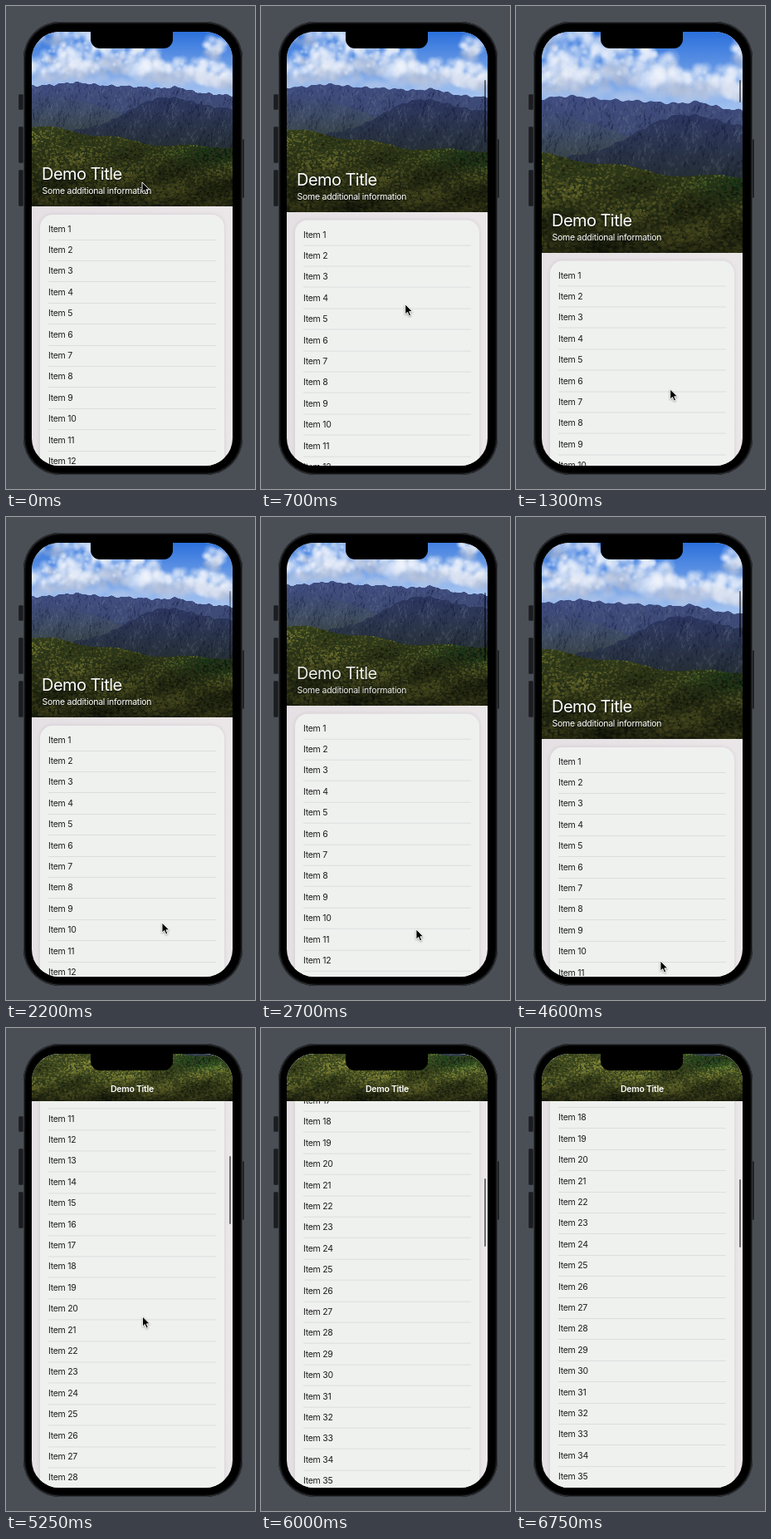
Animation, 300 px wide and 581 px high, one loop 6.8 s. Source, as an HTML page with a canvas:

```html
<!DOCTYPE html>
<html lang="en">
<head>
<meta charset="utf-8">
<title>Sticky header demo</title>
<style>
  html, body { margin: 0; width: 100%; height: 100%; overflow: hidden; background: #4a4f56; }
  #stage { position: relative; width: 300px; height: 581px; overflow: hidden; font-family: Inter, Roboto, sans-serif; }
  #stage div, canvas, svg { position: absolute; }
  .button { background: #1b1d20; border-radius: 2px; box-shadow: inset 0 0 0 .5px #303338; }
  #body { left: 20.5px; top: 19px; width: 264px; height: 545px; border-radius: 44px; background: #000; box-shadow: inset 0 0 0 1px #35373a, inset 0 0 0 2.5px #121315; }
  #screen { left: 31px; top: 31px; width: 241.5px; height: 522px; border-radius: 33px; overflow: hidden; background: linear-gradient(90deg, #e5e0e3, #ebe7e9); }
  #list { left: 0; top: .4px; width: 242px; }
  #card { left: 10px; top: 220px; width: 222px; height: 1060px; border-radius: 15px; background: #eff1ef; box-shadow: 0 0 5px rgba(60, 40, 60, .13); }
  .row { left: 10px; width: 202px; height: 25.4px; line-height: 25.4px; font-size: 10.5px; letter-spacing: -.28px; color: #1d1d1d; white-space: nowrap; }
  .row::after { content: ""; position: absolute; left: 0; right: 0; bottom: -.5px; height: 1px; background: #dcdedd; }
  #header { left: 0; top: 0; width: 242px; overflow: hidden; color: #fff; white-space: nowrap; }
  #photo { bottom: 0; }
  #shade { inset: 0; background: linear-gradient(transparent 45%, rgba(0, 0, 0, .6)); }
  #big { inset: 0; text-shadow: .5px .5px 1px rgba(0, 0, 0, .6); }
  #title { left: 12px; bottom: 27px; font-size: 20px; line-height: 24px; letter-spacing: -.55px; }
  #sub { left: 12.5px; bottom: 10.6px; font-size: 10.5px; line-height: 14px; letter-spacing: -.26px; }
  #small { left: 0; width: 242px; top: 35px; text-align: center; font-weight: 600; font-size: 10.5px; line-height: 16px; letter-spacing: -.28px; }
  #bar { left: 237.5px; width: 2.4px; border-radius: 2px; background: rgba(0, 0, 0, .52); }
  #notch { left: 102px; top: 29px; width: 99px; height: 22px; border-radius: 0 0 11px 11px; background: #000; }
  #cursor { left: 0; top: 0; filter: drop-shadow(0 1px 1px rgba(0, 0, 0, .35)); }
</style>
</head>
<body>
<div id="stage">
  <div class="button" style="left:15px;top:106px;width:6px;height:19px"></div>
  <div class="button" style="left:15px;top:145px;width:6px;height:44px"></div>
  <div class="button" style="left:15px;top:197px;width:6px;height:44px"></div>
  <div class="button" style="left:283px;top:160px;width:4px;height:71px"></div>
  <div id="body"></div>
  <div id="screen">
    <div id="list"><div id="card"></div></div>
    <div id="header">
      <canvas id="photo" width="945" height="630"></canvas>
      <div id="shade"></div>
      <div id="big">
        <div id="title">Demo Title</div>
        <div id="sub">Some additional information</div>
      </div>
      <div id="small">Demo Title</div>
    </div>
    <div id="bar"></div>
  </div>
  <div id="notch"></div>
  <svg id="cursor" width="12" height="18" viewBox="-1 -1 12 18">
    <path d="M0 0V12L2.8 9.5L4.7 14L6.8 13.1L4.9 8.8H8.7Z" fill="#000" stroke="#fff" stroke-width=".9" stroke-linejoin="round"/>
  </svg>
</div>
<script>
const LOOP = 6800, STEP = 50, OPEN = 210, CLOSED = 57, ROW = 25.4, WIDE = 315;
const $ = id => document.getElementById(id);
const clamp = v => Math.min(1, Math.max(0, v));
const part = (t, a, b) => clamp((t - a) / (b - a));
const ease = (t, a, b) => {
  const u = part(t, a, b);
  return u * u * (3 - 2 * u);
};

// Landscape, in units of the open header
let seed = 11;
const rnd = () => (seed = seed * 16807 % 2147483647) / 2147483647;
const range = (a, b) => a + rnd() * (b - a);
const hill = (x, mid, w) => Math.exp(-(((x - mid) / w) ** 2));
const rough = x => .8 * Math.sin(x / 3.1) + .6 * Math.sin(x / 1.7 + 2);

const farRidge = x => 65 + 12 * ease(x, 130, 300) - 4 * hill(x, 88, 26) - 4 * hill(x, 212, 16) + rough(x);
const leftRidge = x => 78 + 42 * ease(x, 60, 230) - 3 * hill(x, 60, 20) + rough(x);
const nearRidge = x => 120 - 40 * hill(x, 196, 62) - 24 * hill(x, 300, 60) + rough(x);
const forestEdge = x => 114 + 24 * ease(x, 20, 230) + 2 * Math.sin(x / 13);

function paintPhoto() {
  const c = $('photo').getContext('2d');
  c.scale(3, 3);

  const fade = (y0, y1, from, to) => {
    const g = c.createLinearGradient(0, y0, 0, y1);
    g.addColorStop(0, from);
    g.addColorStop(1, to);
    return g;
  };
  const puff = (x, y, r, rgb, a) => {
    const g = c.createRadialGradient(x, y, 0, x, y, r);
    g.addColorStop(0, `rgba(${rgb},${a})`);
    g.addColorStop(1, `rgba(${rgb},0)`);
    c.fillStyle = g;
    c.fillRect(x - r, y - r, 2 * r, 2 * r);
  };
  // Puffs scattered in an ellipse, greyer towards its foot
  const cloud = (cx, cy, w, h, n) => {
    for (let i = 0; i < n; i++) {
      const a = range(0, 2 * Math.PI), d = Math.sqrt(rnd()), k = d * Math.sin(a);
      const rgb = k + range(-.4, .4) > .3 ? '170,184,212' : '240,244,252';
      puff(cx + w * d * Math.cos(a), cy + h * k, range(3, 10), rgb, .5);
    }
  };
  const fillBelow = (top, style) => {
    c.beginPath();
    c.moveTo(0, OPEN);
    for (let x = 0; x <= WIDE; x++) c.lineTo(x, top(x));
    c.lineTo(WIDE, OPEN);
    c.fillStyle = style;
    c.fill();
  };
  const mountain = (top, peak, from, to) => {
    c.save();
    fillBelow(top, fade(peak, peak + 62, from, to));
    c.clip();
    for (let i = 0; i < 1500; i++) {
      const x = range(0, WIDE), y = top(x) + range(0, 55);
      const lit = Math.sin(x / 6 + y / 9) + range(-1, 1) > 0;
      c.strokeStyle = lit ? 'rgba(122,138,155,.16)' : 'rgba(10,16,42,.22)';
      c.lineWidth = range(.5, 1.6);
      c.beginPath();
      c.moveTo(x, y);
      c.lineTo(x + range(-3, 2), y + range(2, 6));
      c.stroke();
    }
    c.restore();
  };

  c.fillStyle = fade(0, 75, '#2b70dc', '#a4c3f0');
  c.fillRect(0, 0, WIDE, OPEN);
  cloud(95, 6, 95, 9, 80);
  cloud(120, 30, 72, 20, 190);
  cloud(50, 45, 70, 13, 130);
  cloud(215, 47, 65, 13, 140);
  cloud(285, 58, 50, 9, 80);
  cloud(258, 20, 14, 12, 30);
  for (let x = 0; x < WIDE; x += 7) puff(x, range(54, 66), range(6, 12), '196,207,230', .4);

  mountain(farRidge, 62, '#3f4c80', '#3b4868');
  mountain(leftRidge, 75, '#3d4a78', '#414f46');
  mountain(nearRidge, 78, '#2b3560', '#303c46');

  // Trees, painted from the far edge to the near one
  fillBelow(forestEdge, '#35431f');
  const trees = 5200;
  for (let i = 0; i < trees; i++) {
    const d = i / trees, x = range(0, WIDE), edge = forestEdge(x);
    const y = edge + d * (214 - edge), r = .6 + d * 1.3 + rnd() * .7;
    const clump = Math.sin(x / 17 + y / 7) + Math.sin(x / 29 - y / 11);
    const dell = hill(x, 262, 45) * hill(y, 146, 12);
    const light = clamp(.5 + .17 * clump + range(-.3, .3) - .5 * dell);
    c.fillStyle = `hsl(${74 - 12 * light + 60 * dell}, 42%, ${11 + 27 * light}%)`;
    c.beginPath();
    c.ellipse(x, y, r, r * .85, 0, 0, 7);
    c.fill();
  }
}

function buildList() {
  for (let i = 0; i < 40; i++) {
    const row = document.createElement('div');
    row.className = 'row';
    row.textContent = 'Item ' + (i + 1);
    row.style.top = 4.3 + i * ROW + 'px';
    $('card').append(row);
  }
}

// Pull down and release, drag up, drag back, then flick and glide to rest
const pull = t => ease(t, 550, 1250) - ease(t, 1500, 2050);
const drag = t => ease(t, 2500, 3650);
const back = t => ease(t, 3850, 4600);
const glide = t => 1 - Math.exp(-((Math.max(0, t - 4750) / 434) ** 1.5));
const scrollAt = t => -55.5 * pull(t) + 178 * drag(t) - 204 * back(t) + 618 * glide(t);

const cursorX = t => 164 + 24 * ease(t, 0, 1600) - 13 * drag(t) - back(t) - 22 * ease(t, 4750, 5850);
const cursorY = t => 212 + 249 * ease(t, 0, 1250) + 27 * ease(t, 1500, 1900) + 22 * ease(t, 2200, 2500)
  - 175 * drag(t) + 199 * back(t) - 555 * part(t, 4750, 5850) ** 1.38;
const barAlpha = t => ease(t, 550, 650) - ease(t, 2050, 2400) + ease(t, 2500, 2600);

function draw(t) {
  const s = scrollAt(t), height = Math.max(CLOSED, OPEN - s);
  const ratio = clamp(1 - s / (OPEN - CLOSED));
  const photoH = ratio > 0 ? Math.max(OPEN, height) : 242 / 1.5;
  const px = (id, props) => {
    for (const p in props) $(id).style[p] = props[p] + 'px';
  };
  $('list').style.transform = `translateY(${-s}px)`;
  px('header', { height });
  px('photo', { height: photoH, width: photoH * 1.5, left: 121 - photoH * .75 });
  $('big').style.opacity = ratio;
  $('small').style.opacity = clamp(1 - 5 * ratio);
  px('bar', { top: 58 + Math.max(0, s) * .157, height: 82 + Math.min(0, s) });
  $('bar').style.opacity = barAlpha(t);
  $('cursor').style.transform = `translate(${cursorX(t) - 1}px, ${cursorY(t) - 1}px)`;
}

paintPhoto();
buildList();
const start = performance.now();
function tick() {
  const t = (performance.now() - start) % LOOP;
  draw(Math.floor(t / STEP) * STEP);
  requestAnimationFrame(tick);
}
tick();
</script>
</body>
</html>
```
